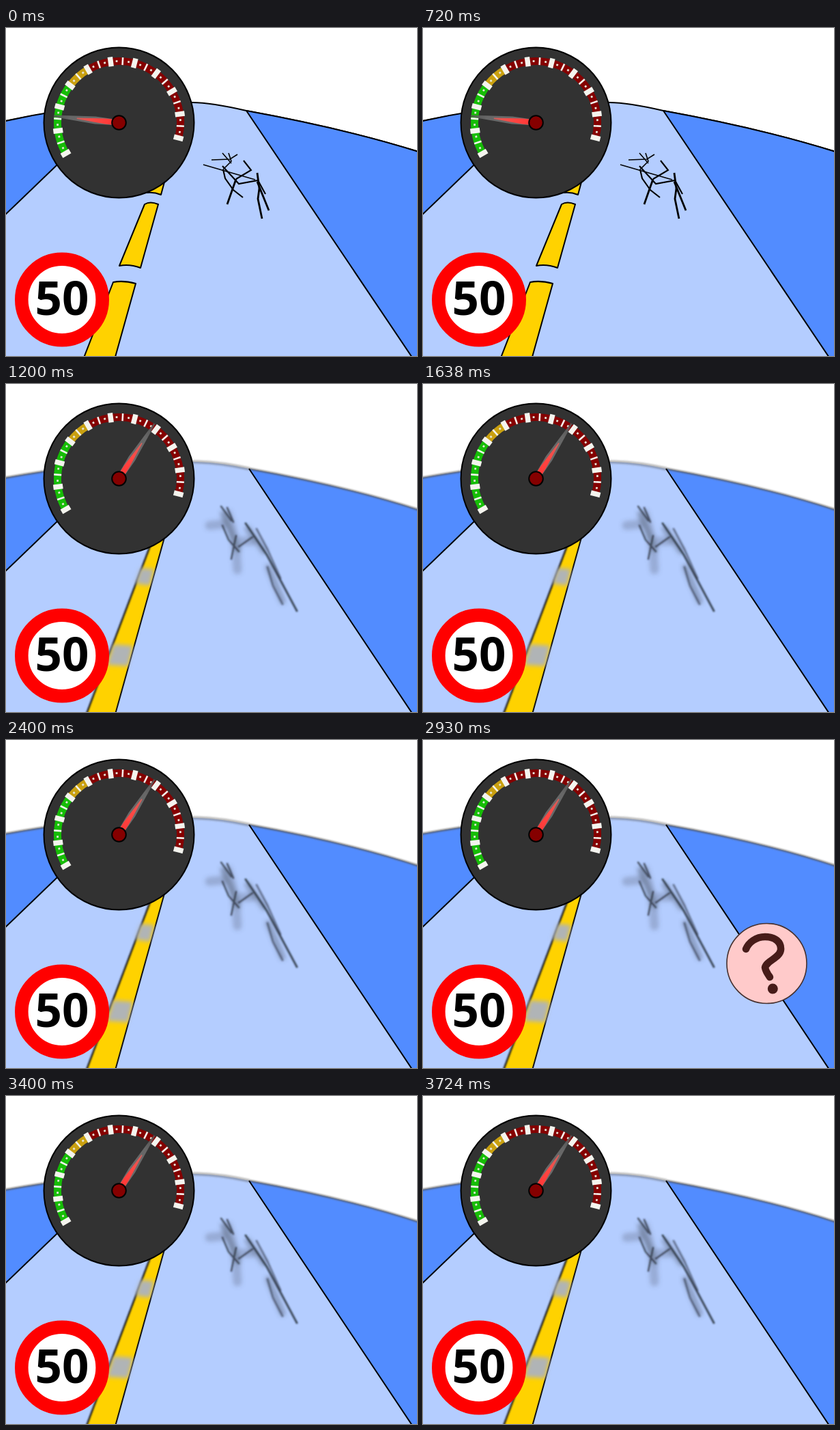
An HTML page that plays this animation: 602x480 px, repeating every 3.94 s.

```html
<!DOCTYPE html>
<html lang="en">
<head>
<meta charset="utf-8">
<title>Speeding</title>
<style>
html, body { margin: 0; width: 100%; height: 100%; overflow: hidden; background: #fff; }
svg { display: block; width: 602px; height: 480px; }
</style>
</head>
<body>
<svg viewBox="0 0 602 480" stroke-linejoin="round">
  <defs>
    <filter id="soft" x="-30%" y="-30%" width="160%" height="160%"><feGaussianBlur stdDeviation="1.1"/></filter>
    <filter id="haze" x="-60%" y="-60%" width="220%" height="220%"><feGaussianBlur stdDeviation="3"/></filter>
    <linearGradient id="steel"><stop offset="0" stop-color="#777"/><stop offset=".75" stop-color="#707070"/><stop offset="1" stop-color="#555"/></linearGradient>
    <linearGradient id="glow"><stop offset="0" stop-color="#f33"/><stop offset=".6" stop-color="#ff4844"/><stop offset="1" stop-color="#d0605c"/></linearGradient>
  </defs>

  <!-- standing still -->
  <g id="slow" stroke="#000" stroke-width="2">
    <path fill="#b4cdff" d="M-5 137Q130 108 273 109Q300 109 352 121Q500 148 607 182V485H-5Z"/>
    <path fill="#528cff" d="M352 121Q500 148 607 182V500Z M-5 137Q75 119 150 113V128L-5 277Z"/>
    <path fill="#ffd200" d="M215 222L207 241Q217 240 227 244L234 218Z
      M203 258Q211 253 223 258L197 351Q181 345 166 348Z
      M157 372Q172 369 190 374L159 485H113Z"/>
    <g fill="none" stroke-linejoin="miter">
      <path stroke-width="1.6" d="M289 200L365 222M301 193L328 192L339 185M317 183L330 198M326 183L330 195L318 207"/>
      <path stroke-width="2.1" d="M348 194L359 208L337 221M317 202L341 228L369 223L380 243M318 207L321 220L333 237L347 248"/>
      <path stroke-width="2.8" d="M337 221L324 258M368 212L371 235L369 250L375 279M368 225L385 267"/>
    </g>
  </g>

  <!-- motion blur -->
  <g id="fast">
    <path fill="#b4cdff" d="M-5 138Q130 113 280 114Q315 115 356 124Q500 150 607 185V485H-5Z"/>
    <path fill="#528cff" d="M356 124Q500 150 607 185V500Z M-5 138Q75 123 150 117V129L-5 278Z"/>
    <g fill="none" stroke="#555" filter="url(#soft)">
      <path stroke-width="3" opacity=".75" d="M-5 138Q130 113 240 114M356 124Q500 150 607 185"/>
      <path stroke-width="5" opacity=".4" d="M240 114H280Q315 115 356 124"/>
    </g>
    <path fill="none" stroke="#000" stroke-width="2" d="M356 124L607 500M-5 278L150 129"/>
    <path fill="#ffd200" d="M216 224L117 485H159.5L232.8 222Z"/>
    <path fill="none" stroke="#222" stroke-width="2.6" filter="url(#soft)" d="M216 224L117 485"/>
    <path fill="none" stroke="#111" stroke-width="2" d="M232.8 222L159.5 485"/>
    <g fill="#b0b4b6" filter="url(#haze)">
      <path d="M197 269L217 271L211 295L189 292Z"/>
      <path d="M157 381L186 383L179 413L148 411Z"/>
    </g>
    <g fill="none" stroke="#4c5568" stroke-linecap="round" filter="url(#haze)">
      <path stroke-width="13" opacity=".28" d="M298 207L328 204M325 190L336 230L339 272M340 230L360 230"/>
      <path stroke-width="9" opacity=".4" d="M318 190L340 242M354 212L378 245M384 268L405 318"/>
    </g>
    <g fill="none" stroke="#242a36" stroke-linecap="round" filter="url(#soft)">
      <path stroke-width="2.6" opacity=".7" d="M315 179L330 200M324 181L333 202M317 207L326 228L341 245M337 222L330 256M341 238L361 224"/>
      <path stroke-width="3" opacity=".8" d="M351 204L382 250L426 332"/>
      <path stroke-width="3" opacity=".5" d="M367 212L383 242L402 284M383 268L391 295L405 322"/>
    </g>
  </g>

  <g transform="translate(165.5 138.5)">
    <circle r="110" fill="#323232" stroke="#000" stroke-width="2"/>
    <g id="dial"></g>
    <g id="needle">
      <path fill="url(#steel)" opacity=".85" d="M0 -4L35 -5.5L96 -1.2V1.2L35 5.5L0 4Z"/>
      <path fill="url(#glow)" d="M0 -4L20 -4L62 -.8V.8L20 4L0 4Z"/>
    </g>
    <circle r="10.3" fill="#850000" stroke="#000" stroke-width="2"/>
  </g>

  <circle cx="82" cy="397.5" r="59.2" fill="#fff" stroke="red" stroke-width="19.6"/>
  <text x="82" y="420" font-family="'Noto Sans', 'Open Sans', sans-serif" font-weight="700" font-size="69" text-anchor="middle">50</text>

  <g id="query">
    <circle cx="503.5" cy="327" r="58.5" fill="#ffcaca" stroke="#45302e" stroke-width="1.6"/>
    <path fill="none" stroke="#471c19" stroke-width="10.5" stroke-linecap="round" d="M473 306C477 296 488 288 501 288C516 288 525 296 524 307C523 319 503 323 501 333C502 339 506 344 508 347"/>
    <circle cx="512.3" cy="364" r="7.5" fill="#471c19"/>
  </g>
</svg>
<script>
const $ = id => document.getElementById(id);
const START = 150, STEP = 22.44, RADIUS = 90;

// A rectangle centred on the dial's ring, turned towards the given angle.
const mark = (angle, length, width, fill) =>
  `<rect x="${RADIUS - length / 2}" y="${-width / 2}" width="${length}" height="${width}" fill="${fill}" transform="rotate(${angle})"/>`;

function arc(from, to, color) {
  const point = step => {
    const a = (START + step * STEP) * Math.PI / 180;
    return `${RADIUS * Math.cos(a)} ${RADIUS * Math.sin(a)}`;
  };
  return `<path fill="none" stroke="${color}" stroke-width="11" d="M${point(from)}A${RADIUS} ${RADIUS} 0 0 1 ${point(to)}"/>`;
}

let dial = arc(0, 3, '#16bd06') + arc(3, 4, '#c9a010') + arc(4, 10, '#850000');
for (let i = 0; i <= 40; i++) {
  const angle = START + i * STEP / 4;
  dial += i % 4 === 0 ? mark(angle, 14, 7.5, '#f4f4ee')
    : i % 2 === 0 ? mark(angle, 11, 2.6, '#f4f4ee')
    : mark(angle, 2.8, 2.8, '#e6e6d8');
}
$('dial').innerHTML = dial;

const show = (id, on) => $(id).setAttribute('visibility', on ? 'visible' : 'hidden');

function draw(now) {
  const t = now % 3940;
  const fast = t >= 1200;
  show('slow', !fast);
  show('fast', fast);
  show('query', (t >= 1930 && t < 2400) || (t >= 2930 && t < 3400));
  $('needle').setAttribute('transform', `rotate(${fast ? -57.2 : -174.2})`);
}

const origin = performance.now();
function tick() {
  draw(performance.now() - origin);
  requestAnimationFrame(tick);
}
tick();
</script>
</body>
</html>
```
